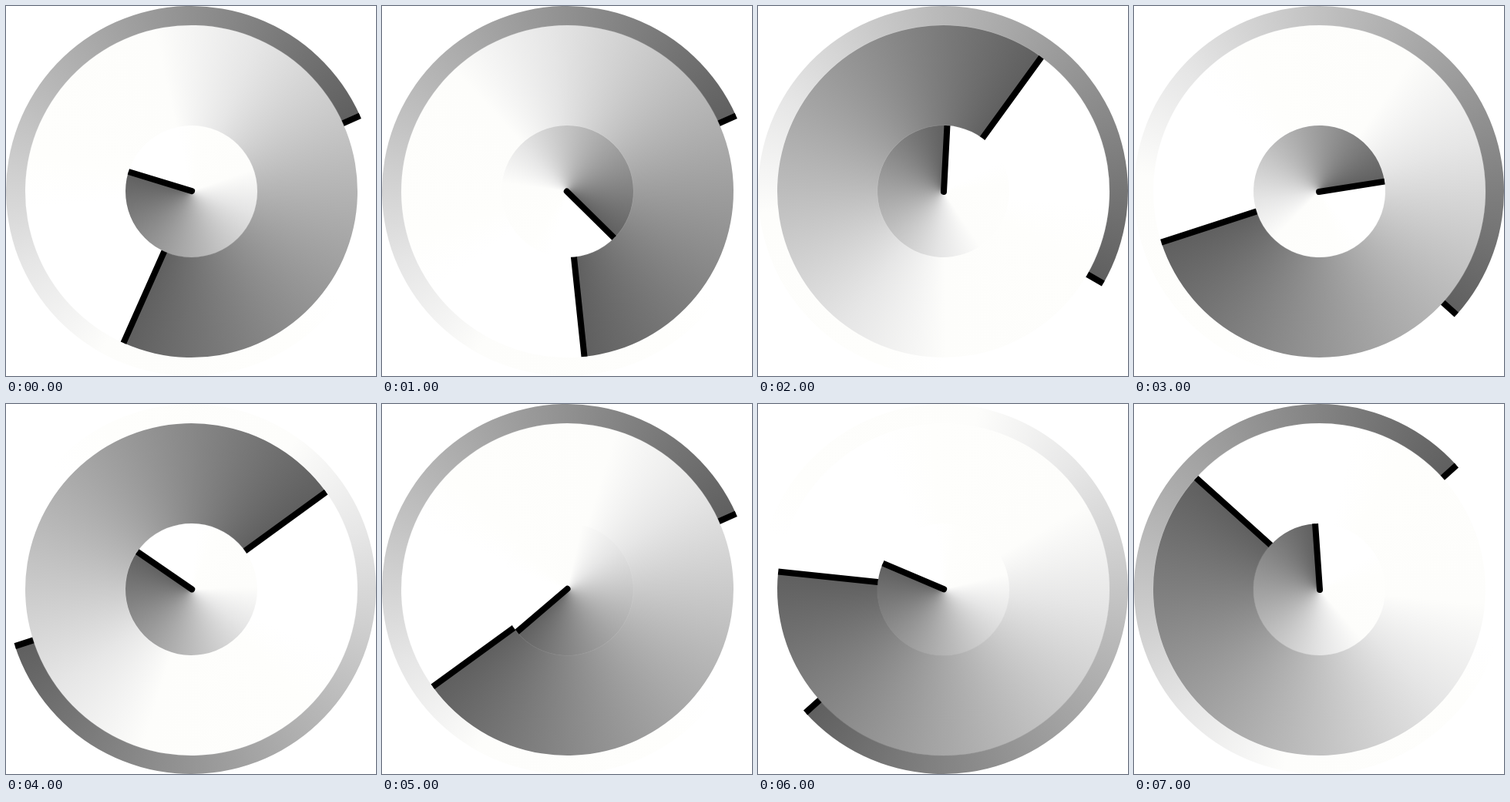
Animation, 480 px wide and 480 px high, one loop 8000 ms. Source, as an HTML page:

```html
<!DOCTYPE html>
<html lang="en">
<head>
<meta charset="utf-8">
<title>Gradient clock</title>
<style>
  html, body {
    margin: 0;
    width: 100%;
    height: 100%;
    overflow: hidden;
    background: #fff;
  }

  .clock {
    position: relative;
    width: 480px;
    height: 480px;
    overflow: hidden;
    animation: tick 8s step-end infinite;
  }

  .disc {
    position: absolute;
    inset: var(--inset);
    border-radius: 50%;
    background: conic-gradient(
      #fff 60deg, #fefefc 80deg, #fdfdfb 143deg, #f6f6f5 154deg,
      #e6e6e6 180deg, #b8b8b8 240deg, #8c8c8c 300deg, #5f5f5f 360deg);
    transform: rotate(var(--turn));
  }

  /* hand */
  .disc::after {
    content: "";
    position: absolute;
    top: 0;
    left: calc(50% - 4px);
    width: 8px;
    height: calc(50% + 4px);
    border-radius: 0 0 4px 4px;
    background: #000;
  }

  .seconds { --inset: 0; --turn: calc(var(--s) * 6deg); }
  .minutes { --inset: 24.5px; --turn: calc(var(--m) * 6deg); }
  .hours { --inset: 154.5px; --turn: calc(var(--h) * 30deg + var(--m) * .5deg); }
  .minutes, .hours { box-shadow: 0 0 1px rgba(255, 255, 255, .5); }

  @keyframes tick {
    0%    { --h: 9;  --m: 34; --s: 11; }
    12.5% { --h: 4;  --m: 29; --s: 11; }
    25%   { --h: 0;  --m: 6;  --s: 20; }
    37.5% { --h: 2;  --m: 42; --s: 22; }
    50%   { --h: 10; --m: 9;  --s: 42; }
    62.5% { --h: 7;  --m: 39; --s: 11; }
    75%   { --h: 9;  --m: 46; --s: 38; }
    87.5%, 100% { --h: 11; --m: 52; --s: 8; }
  }
</style>
</head>
<body>
<div class="clock">
  <div class="disc seconds"></div>
  <div class="disc minutes"></div>
  <div class="disc hours"></div>
</div>
</body>
</html>
```
